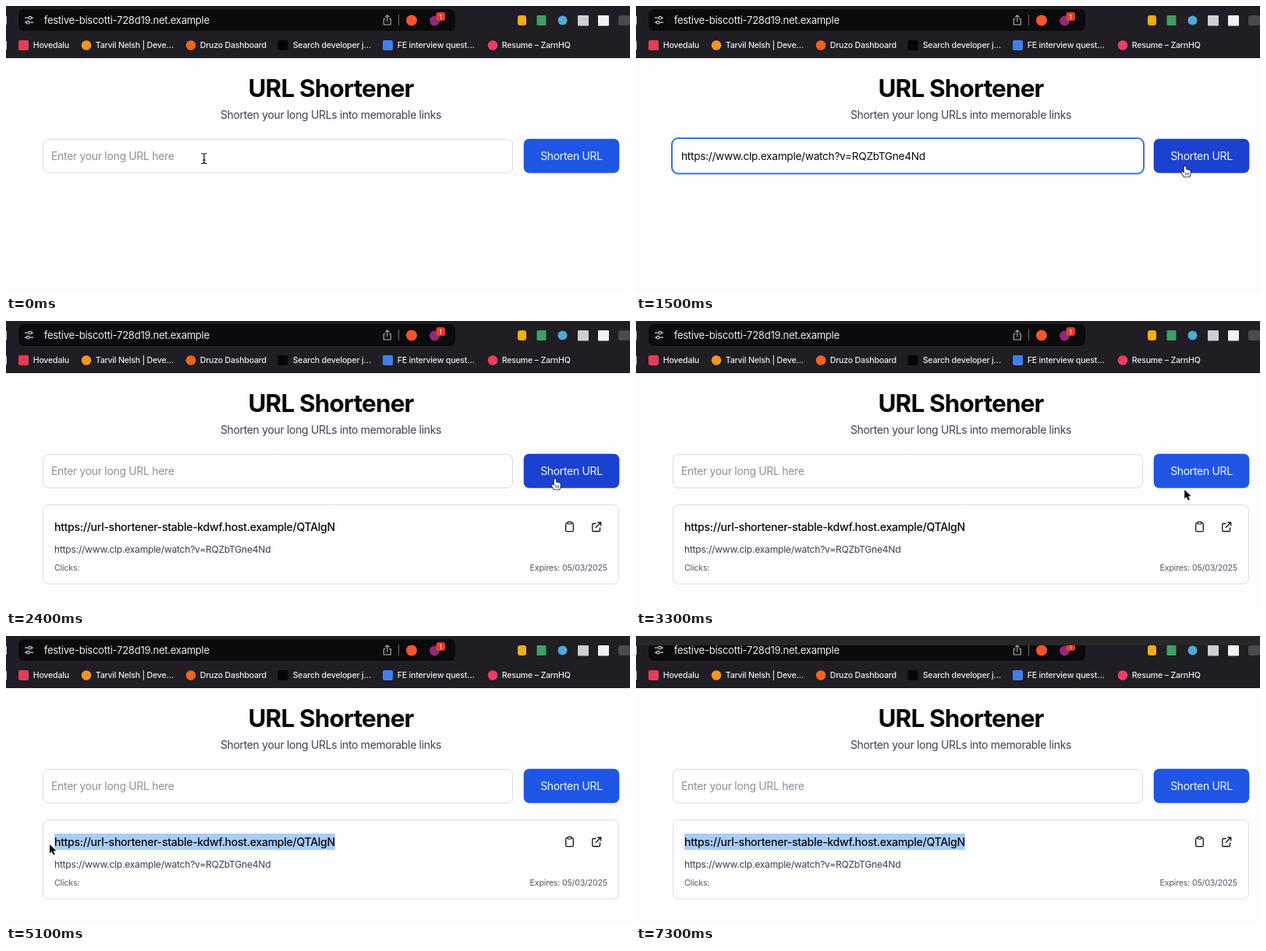
These frames come from a looping animation (800x369 px, 7.4 s). An HTML page with a canvas:

```html
<!DOCTYPE html>
<html lang="en">
<head>
<meta charset="utf-8">
<title>URL Shortener</title>
<style>
html, body { margin: 0; width: 100%; height: 100%; overflow: hidden; background: #fdfcfe; }
canvas { display: block; width: 800px; height: 369px; }
</style>
</head>
<body>
<canvas id="stage"></canvas>
<script>
const W = 800, H = 369, LOOP = 7400, STEP = 100;
const canvas = document.getElementById('stage');
const ratio = Math.max(1, window.devicePixelRatio || 1);
canvas.width = W * ratio;
canvas.height = H * ratio;
const ctx = canvas.getContext('2d');
ctx.scale(ratio, ratio);

const SITE = 'festive-biscotti-728d19.net.example';
const LONG_URL = 'https://www.clp.example/watch?v=RQZbTGne4Nd';
const SHORT_URL = 'https://url-shortener-stable-kdwf.host.example/QTAlgN';
const BODY = 13.9, LINK = 14.05, TYPED = 13.65;

const TIME = { focus: 300, paste: 700, click: 1800, result: 2300, drag: 4000, dragEnd: 4700, strip: 6300 };

// Pointer hotspot: time, x, y
const PATH = [
  [0, 254, 196], [400, 254, 196], [800, 259, 196], [1100, 259, 196],
  [1300, 500, 214], [1500, 704, 206], [1700, 704, 203], [2900, 704, 203],
  [3100, 703.2, 217], [3400, 703.2, 217], [3800, 424, 266], [4000, 424, 267],
  [4400, 145, 269], [4600, 56, 268], [5300, 56, 268], [5900, 90, -30], [LOOP, 90, -30]
];

function pointer(t) {
  let i = 1;
  while (i < PATH.length - 1 && PATH[i][0] < t) i++;
  const [t0, x0, y0] = PATH[i - 1], [t1, x1, y1] = PATH[i];
  const k = Math.min(1, Math.max(0, (t - t0) / (t1 - t0)));
  return { x: x0 + (x1 - x0) * k, y: y0 + (y1 - y0) * k };
}

function rect(x, y, w, h, color) {
  ctx.fillStyle = color;
  ctx.fillRect(x, y, w, h);
}

function box(x, y, w, h, r, fill, stroke, width = 1) {
  ctx.beginPath();
  ctx.roundRect(x, y, w, h, r);
  if (fill) { ctx.fillStyle = fill; ctx.fill(); }
  if (stroke) { ctx.strokeStyle = stroke; ctx.lineWidth = width; ctx.stroke(); }
}

function dot(x, y, r, color) {
  ctx.beginPath();
  ctx.arc(x, y, r, 0, Math.PI * 2);
  ctx.fillStyle = color;
  ctx.fill();
}

function line(d, color, width) {
  ctx.strokeStyle = color;
  ctx.lineWidth = width;
  ctx.lineCap = ctx.lineJoin = 'round';
  ctx.stroke(new Path2D(d));
}

function setFont(size, weight = 400, tracking = -0.02) {
  ctx.font = `${weight} ${size}px Inter, "Open Sans", sans-serif`;
  ctx.letterSpacing = `${size * tracking}px`;
}

function text(str, x, y, size, color, { weight, align = 'left', tracking } = {}) {
  setFont(size, weight, tracking);
  ctx.textAlign = align;
  ctx.fillStyle = color;
  ctx.fillText(str, x, y);
}

function toolbar() {
  rect(0, 0, W, 67, '#201d24');
  box(16, 4, 560, 28, 7, '#0b0a0d');
  rect(0, 13, 1, 11, '#c9c8cd');
  rect(0, 45, 1, 11, '#c9c8cd');

  // Site settings
  line('M24.5 15.2H28 M33 15.2H34.5 M24.5 21.2H26 M31 21.2H34.5', '#d4d3d8', 1.2);
  ctx.beginPath();
  ctx.arc(30.8, 15.2, 1.8, 0, Math.PI * 2);
  ctx.moveTo(30, 21.2);
  ctx.arc(28.2, 21.2, 1.8, 0, Math.PI * 2);
  ctx.stroke();
  text(SITE, 48.7, 22.6, 13.05, '#ecebef');

  // Share
  line('M486 16.5H484.3V24H493.2V16.5H491.5 M488.8 20V12 M486.4 14.2L488.8 11.8L491.2 14.2', '#b6b5bb', 1.1);
  rect(503, 11, 1, 14, '#6d6b72');

  dot(520, 18.5, 7, '#f9552c');
  dot(549.5, 19, 6.5, '#8f2a76');
  box(551.5, 8, 11.5, 11, 3, '#e63a2e');
  text('1', 557.2, 16.5, 8, '#fff', { align: 'center', tracking: 0 });

  box(656, 12, 11, 13, 3, '#f4ac16');
  box(680.5, 12, 12, 13, 1, '#3f9f62');
  dot(713.5, 18.5, 6, '#4fa9d8');
  box(733, 12, 14, 13.5, 1, '#cfced1');
  box(759, 12, 14, 13.5, 1, '#f4f1f2');
  box(785, 12, 15, 13, 3, '#4b4a51');
}

function bookmarks() {
  const items = [
    [35, 'Hovedalu', '#e43d58', 22.5, true],
    [115, 'Tarvil Nelsh | Deve…', '#f39424', 103, false],
    [249, 'Druzo Dashboard', '#f2651f', 237, false],
    [368, 'Search developer j…', '#060507', 355, true],
    [502, 'FE interview quest…', '#3f80ec', 489.5, true],
    [636, 'Resume – ZarnHQ', '#ee3f62', 624, false]
  ];
  for (const [x, label, color, cx, square] of items) {
    if (square) box(cx - 6.5, 44, 13, 13, 2, color);
    else dot(cx, 50.5, 6.3, color);
    text(label, x - 0.3, 54.3, 10.6, '#ecebf0', { weight: 500 });
  }
}

function form(t, hover) {
  const typing = t >= TIME.focus && t < TIME.click;
  const filled = t >= TIME.paste && t < TIME.result;
  const pressed = t >= TIME.click && t < TIME.result;

  if (typing) box(46, 170, 605, 45.5, 8, '#fefdff', '#3c74d2', 2);
  else box(47.5, 171.5, 602, 43, 7, '#fefdff', '#dcdce1');

  if (filled) text(LONG_URL, 58, 198, TYPED, '#0d0d10');
  else text('Enter your long URL here', 58, 198, BODY, '#8e919a');

  if (typing) {
    const since = t - (t < TIME.paste ? TIME.focus : TIME.paste);
    setFont(TYPED);
    const x = 58 + (filled ? ctx.measureText(LONG_URL).width + 0.5 : 0);
    if (since % 1000 < 500) rect(x, 185, 1, 17, '#0d0d10');
  }

  box(663.7, 170.7, 122.6, 44, 7, hover ? '#1a41d0' : '#1f56e5');
  if (pressed) box(663, 170, 124, 45.5, 8, null, '#3a72dd', 2);
  text('Shorten URL', 725, 198, BODY, '#f4f6ff', { align: 'center' });
}

// Left edge of the selected part, snapped to a letter
function selectionStart(x) {
  setFont(LINK, 500);
  let best = 62;
  for (let i = 0; i <= SHORT_URL.length; i++) {
    const edge = 62 + ctx.measureText(SHORT_URL.slice(0, i)).width;
    if (Math.abs(edge - x) < Math.abs(best - x)) best = edge;
  }
  return best;
}

function card(t) {
  box(47.5, 236.5, 738, 101.5, 7, '#fefdff', '#dedee3');
  if (t >= TIME.drag) {
    const left = selectionStart(pointer(Math.min(t, TIME.dragEnd) - 25).x);
    const right = 62 + ctx.measureText(SHORT_URL).width;
    rect(left, 254, Math.max(0, right - left), 21, '#a9cdfb');
  }
  text(SHORT_URL, 62, 269.6, LINK, '#09090c', { weight: 500 });
  text(LONG_URL, 62, 298.4, 12.1, '#394150');
  text('Clicks:', 62, 320.8, 10.7, '#535a66');
  text('Expires: 05/03/2025', 771, 320.8, 10.7, '#535a66', { align: 'right' });

  // Copy and open
  box(717.7, 259.7, 9.6, 11, 1.5, null, '#131316', 1.3);
  box(720.2, 258.2, 4.6, 2.8, 0.8, '#fefdff', '#131316', 1.2);
  line('M756 260.5H753Q751.8 260.5 751.8 261.7V269.3Q751.8 270.5 753 270.5H760.3Q761.5 270.5 761.5 269.3V266 M758.8 259H762.7V263 M762.4 259.3L756.2 265.5', '#131316', 1.3);
}

function beam(x, y) {
  const d = `M${x - 3} ${y - 6.5}Q${x} ${y - 6.5} ${x} ${y - 4.5}Q${x} ${y - 6.5} ${x + 3} ${y - 6.5}`
    + `M${x} ${y - 5}V${y + 5}M${x - 3} ${y + 6.5}Q${x} ${y + 6.5} ${x} ${y + 4.5}Q${x} ${y + 6.5} ${x + 3} ${y + 6.5}`
    + `M${x - 1.5} ${y + 2}H${x + 1.5}`;
  line(d, 'rgba(255,255,255,.8)', 2.6);
  line(d, '#111', 1.2);
}

function shape(d, x, y, fill, stroke) {
  const p = new Path2D(d);
  ctx.save();
  ctx.translate(x, y);
  ctx.lineJoin = 'round';
  ctx.lineWidth = 1.6;
  ctx.strokeStyle = stroke;
  ctx.stroke(p);
  ctx.fillStyle = fill;
  ctx.fill(p);
  ctx.restore();
}

function arrow(x, y) {
  shape('M0 0V11.5L2.7 9L4.6 13.5L6.7 12.6L4.8 8.3H8.4Z', x, y, '#050505', '#fff');
}

function hand(x, y) {
  shape('M-1.3 0.8Q0 -0.8 1.2 0.8V4.5L2.6 4.2L3.6 5L5 4.8L6.8 6V9.5L5.6 13.5H-1.2L-4.6 8.6Q-4.6 6.8 -3 7.3L-1.3 9Z', x, y, '#fff', '#0a0a14');
  line(`M${x + 0.6} ${y + 8.5}V${y + 11.3}M${x + 2.6} ${y + 8.5}V${y + 11.3}M${x + 4.5} ${y + 8.5}V${y + 11.3}`, '#20202c', 0.7);
}

function inside(p, x, y, w, h) {
  return p.x >= x && p.x <= x + w && p.y >= y && p.y <= y + h;
}

function draw(t) {
  const p = pointer(t);
  const hover = inside(p, 664, 171, 122, 43.5);
  const overText = inside(p, 47, 171, 603, 43.5)
    || (t >= TIME.result && inside(p, 62, 254, 365, 21))
    || (t >= TIME.drag && t < TIME.dragEnd);

  rect(0, 0, W, H, '#fdfcfe');
  toolbar();
  bookmarks();
  text('URL Shortener', 416.5, 117, 31.4, '#08080a', { weight: 700, align: 'center', tracking: -0.025 });
  text('Shorten your long URLs into memorable links', 416.5, 145, BODY, '#3c4350', { align: 'center' });
  form(t, hover);
  if (t >= TIME.result) card(t);

  if (hover) hand(p.x, p.y);
  else if (overText) beam(p.x, p.y);
  else arrow(p.x, p.y);

  // Title strip that drops in when the pointer leaves through the top
  const drop = Math.min(1, Math.max(0, (t - TIME.strip) / 300));
  if (drop > 0) rect(0, 0, W, Math.round(11.5 * drop), '#272729');
}

const start = performance.now();
function tick(now) {
  const t = Math.max(0, now - start) % LOOP;
  draw(Math.floor(t / STEP) * STEP);
  requestAnimationFrame(tick);
}
draw(0);
requestAnimationFrame(tick);
</script>
</body>
</html>
```
